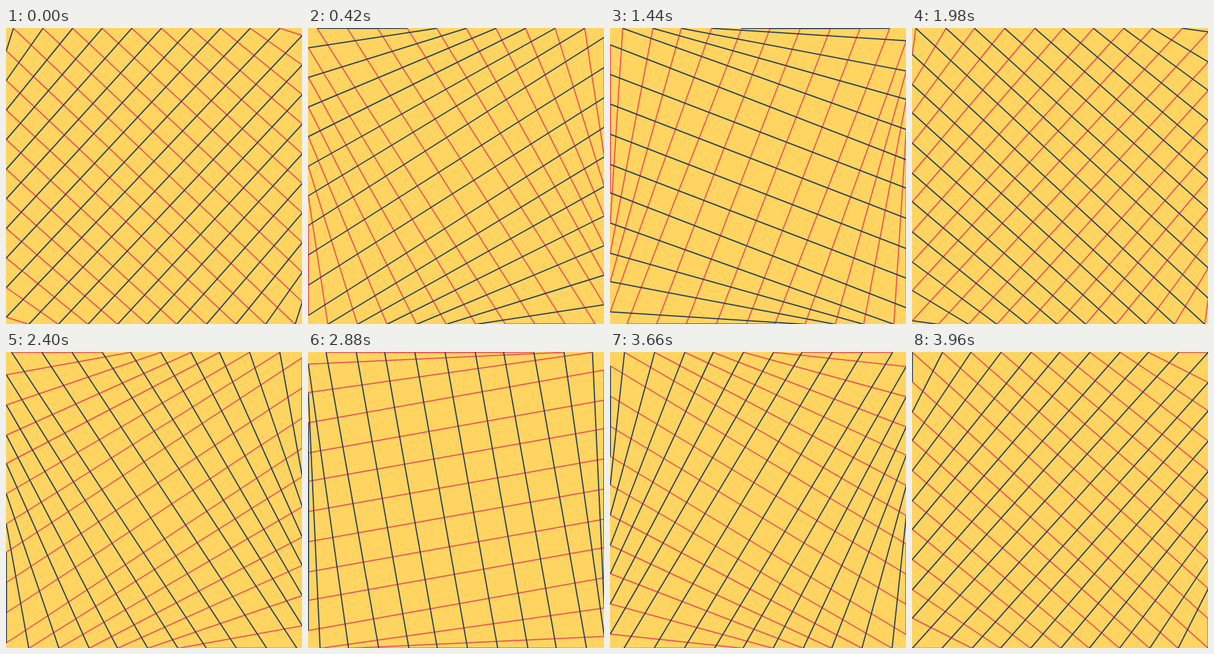
Write an HTML page with a canvas that moves like this. It is 500x500 px and loops after 4020 ms.

```html
<!DOCTYPE html>
<html>
<head>
<meta charset="utf-8">
<title>String grid</title>
<style>
html, body { margin: 0; width: 100%; height: 100%; overflow: hidden; background: #ffd460; }
canvas { display: block; }
</style>
</head>
<body>
<canvas id="stage" width="500" height="500"></canvas>
<script>
const ctx = document.getElementById('stage').getContext('2d');
const SIZE = 500, COUNT = 40, GAP = 50, SPEED = 3;
const TICK = 60, TICKS = 67, STEPS_PER_TICK = 5;
const SIDE_STEPS = Math.ceil(SIZE / SPEED);

// Points walk clockwise and restart exactly at each corner they reach.
function pointAt(i, step) {
  const start = 12 + GAP * i;
  let side = Math.floor(start / SIZE);
  let d = start % SIZE;
  const toCorner = Math.ceil((SIZE - d) / SPEED);
  if (step < toCorner) {
    d += SPEED * step;
  } else {
    const rest = step - toCorner;
    side += 1 + Math.floor(rest / SIDE_STEPS);
    d = SPEED * (rest % SIDE_STEPS);
  }
  return [[d, 0], [SIZE, d], [SIZE - d, SIZE], [0, SIZE - d]][side % 4];
}

// Joins every pair of points whose indices add up to sum (mod COUNT).
function drawLines(points, sum, color) {
  ctx.strokeStyle = color;
  for (let i = 0; i < COUNT; i++) {
    const j = (sum - i + COUNT) % COUNT;
    if (j < i) continue;
    ctx.beginPath();
    ctx.moveTo(...points[i]);
    ctx.lineTo(...points[j]);
    ctx.stroke();
  }
}

function draw(time) {
  const step = Math.floor(time / TICK) % TICKS * STEPS_PER_TICK;
  const points = Array.from({ length: COUNT }, (_, i) => pointAt(i, step));
  ctx.setTransform(1, 0, 0, 1, 0, 0);
  ctx.fillStyle = '#ffd460';
  ctx.fillRect(0, 0, SIZE, SIZE);
  ctx.translate(0.5, 0.5);
  ctx.lineWidth = 2;
  drawLines(points, 19, '#ea5455');
  drawLines(points, 39, '#2d4059');
}

const begin = performance.now();
function loop() {
  draw(performance.now() - begin);
  requestAnimationFrame(loop);
}
loop();
</script>
</body>
</html>
```
